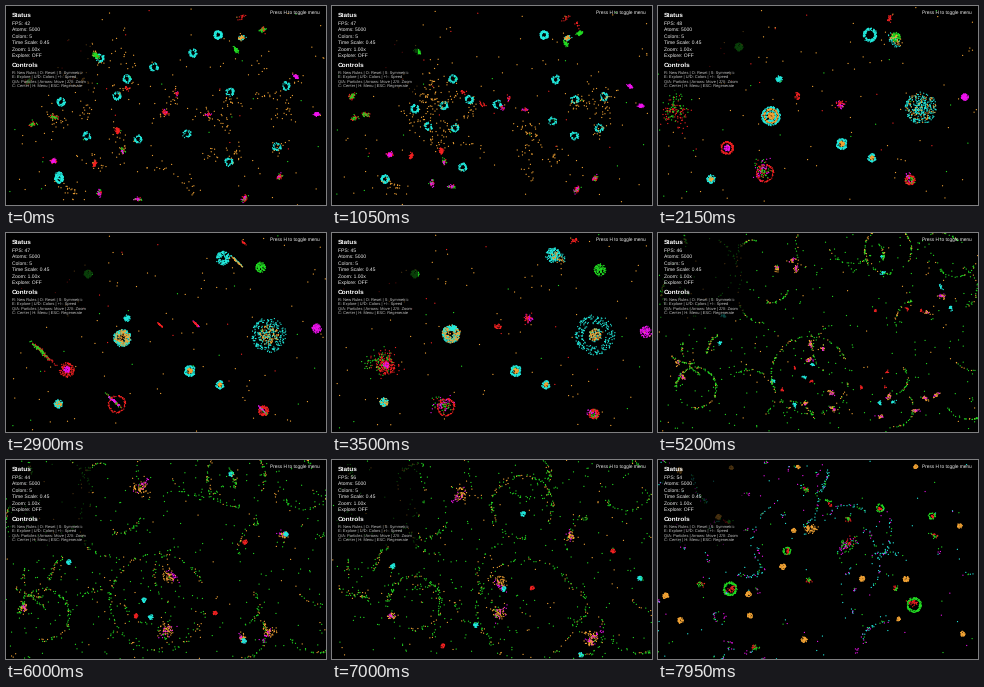
A matplotlib script for the animation above (8 s loop, 320 by 199 pixels).

```python
import numpy as np
import matplotlib.pyplot as plt
from matplotlib.animation import FuncAnimation
from matplotlib.colors import to_rgb
from matplotlib.patches import Rectangle

W, H, FRAMES, STEP = 320, 199, 160, 50
COLORS = {"g": "#22dc22", "o": "#f5a535", "c": "#22ecdf", "m": "#f012f0", "r": "#f52222"}
rng = np.random.default_rng(11)


def grid(nx, ny):
    """Jittered grid of sites in random order."""
    x, y = np.meshgrid(np.arange(nx) + 0.5, np.arange(ny) + 0.5)
    p = np.column_stack([x.ravel(), y.ravel()]) + rng.uniform(-0.38, 0.38, (nx * ny, 2))
    return rng.permutation(p * [W / nx, H / ny])


def polar(a, u, r, hole=0):
    d = np.sqrt(hole ** 2 + (r * r - hole ** 2) * u)
    return np.column_stack([d * np.cos(a), d * np.sin(a)])


def lump(n, r):
    """Irregular clump, longer along one random direction."""
    a = rng.uniform(0, np.pi)
    turn = np.array([[np.cos(a), np.sin(a)], [-np.sin(a), np.cos(a)]])
    return rng.normal(0, r, (n, 2)) * [0.6, 0.35] @ turn


class Scene:
    """Particles with three waypoints: a moving centre plus a changing offset."""

    def __init__(self, start, times, sites=(), scatter=True):
        self.start, self.times, self.scatter = start, times, scatter
        self.sites = {c: np.array(sites, float).reshape(-1, 2) for c in COLORS}
        self.centres, self.offsets, self.tints = [], [], ""

    def add(self, tints, centres, offsets):
        n = len(tints)
        self.tints += "".join(tints)
        self.centres.append(np.array([np.broadcast_to(c, (n, 2)) for c in centres], float))
        self.offsets.append(np.array(offsets, float))

    def take(self, k, c, near):
        """Claim the k free sites closest to a point."""
        pool = self.sites[c]
        order = np.argsort(((pool - near) ** 2).sum(1))
        got = pool[order[:k]]
        self.sites[c] = pool[order[k:]]
        return got if len(got) else np.array([near], float)

    def grow(self, tints, p1, p2, o1, o2, size, cells):
        """Small cells that travel to p1, merge there, then drift to p2."""
        home = self.take(cells, tints[0], p1)
        cell = rng.integers(0, len(home), len(tints))
        o0 = np.zeros_like(o1)
        for i in range(len(home)):
            m = cell == i
            n = m.sum()
            if set(tints) == {"c"} and n > 30:
                o0[m] = polar(rng.uniform(0, 7, n), rng.random(n), 4.3, 2.3)
            else:
                o0[m] = lump(n, size)
        self.add(tints, (home[cell], p1, p2), (o0, o1, o2))

    def disc(self, c, p1, p2, r, hole=0, later=None, dense=1.7, per=45, size=2.4):
        n = int(dense * np.pi * (r * r - hole ** 2)) + 3
        a, u = rng.uniform(0, 2 * np.pi, n), rng.random(n)
        o1 = polar(a, u, r, hole)
        o2 = polar(a + 0.6, u, *later) if later else o1
        if c == "o" and not self.scatter:
            per, size = 13, 12
        self.grow([c] * n, p1, p2, o1, o2, size, max(1, n // per))

    def swarm(self, mix, p1, p2, r, n, cells=2):
        """Tangle of several colours, one lobe per letter."""
        o1 = np.vstack([lump(n, r) + rng.normal(0, r * 0.3, 2) for _ in mix])
        self.grow(list(np.repeat(list(mix), n)), p1, p2, o1, o1[:, ::-1], 3, cells)

    def arc(self, mix, n, p1, p2, r, sweep):
        a = np.radians(rng.uniform(0, 360) + rng.uniform(0, sweep, n))
        rim, noise = polar(a, 1, r), rng.normal(0, 0.5, (n, 2))
        self.add(rng.choice(list(mix), n), (p1, p1, p2),
                 (rim * 0.8 + noise, rim + 2 * noise, rim * 1.05 + 2.5 * noise))

    def arcs(self, mix, count, n, r, sweep):
        for p in grid(count, count)[:count]:
            self.arc(mix, n, p, p + rng.normal(0, 6, 2),
                     rng.uniform(*r), rng.uniform(*sweep))

    def dust(self, mix, n):
        p, d = rng.random((n, 2)) * [W, H], rng.normal(0, 6, (n, 2))
        self.add(rng.choice(list(mix), n), (p - d, p, p + d), np.zeros((3, n, 2)))

    def build(self):
        self.centres = np.concatenate(self.centres, 1)
        self.offsets = np.concatenate(self.offsets, 1)
        self.tints = np.array([to_rgb(COLORS[c]) for c in self.tints])
        shape = self.tints.shape[0], 2
        self.noise = rng.random(shape) * [W, H]
        self.phase = rng.uniform(0, 2 * np.pi, shape)
        return self

    def at(self, t):
        t0, t1, t2 = self.times
        i = int(t >= t1)
        if i:
            u = (t - t1) / (t2 - t1)
            v = min(u, 1)
        else:
            u = max(0, (t - t0) / (t1 - t0))
            v = max(0, 2 * u - 1)
            u = u * u * (3 - 2 * u)
        p = sum(k[i] * (1 - w) + k[i + 1] * w
                for k, w in ((self.centres, u), (self.offsets, v)))
        if self.scatter:
            loose = max(0, 1 - (t - self.start) / 0.45) ** 2
            p = p * (1 - loose) + self.noise * loose
        return p + 0.25 * np.sin(9 * t + self.phase)


def orbs():
    s = Scene(0, (0, 2.15, 3.5), grid(9, 6), scatter=False)
    s.sites["c"] = np.array([(94, 52), (148, 61), (111, 90), (55, 96), (81, 130), (132, 133),
                             (181, 128), (223, 156), (224, 86), (187, 47), (280, 80),
                             (271, 141), (53, 170)], float)
    eye = (113, 110), (119, 101)
    for c, r, hole in ("c", 9.5, 7.8), ("o", 7.4, 5.8), ("c", 5.4, 4), ("o", 3.6, 0):
        s.disc(c, *eye, r, hole, (9, hole / 2))
    halo = (263, 102), (263, 102)
    s.disc("c", *halo, 16, 0, (20, 11), dense=0.28)
    s.disc("c", *halo, 7, 0, dense=0.4)
    s.disc("o", *halo, 15, 0, (6, 0), dense=0.11)
    for p in (184, 138), (214, 152):
        r = 5.6 if p[0] < 200 else 4.2
        s.disc("c", p, p, r, r * 0.55)
        s.disc("o", p, p, r * 0.5)
    s.disc("c", (53, 173), (52, 169), 4.2)
    s.disc("o", (53, 173), (52, 169), 2, 0, (4.2, 0))
    s.disc("c", (121, 73), (121, 95), 3.2)
    s.disc("c", (212, 29), (221, 22), 7, 4.5, (7.5, 0))
    s.disc("g", (238, 31), (268, 37), 4.5, 0, (6, 0))
    s.swarm("co", (235, 32), (224, 22), 6, 30)
    s.disc("m", (307, 91), (314, 99), 3.5, 0, (6, 0), dense=2.5)
    s.disc("g", (81, 41), (83, 41), 4)
    s.disc("r", (69, 142), (54, 133), 6.6, 5, (9, 0))
    s.disc("m", (69, 142), (54, 132), 3)
    s.swarm("rrrgg", (18, 106), (51, 130), 12, 28, 3)
    s.swarm("rgm", (107, 167), (114, 174), 9, 36, 3)
    s.disc("r", (107, 167), (114, 174), 9, 7.5, dense=0.8)
    s.disc("r", (252, 174), (262, 181), 5, 2.2)
    s.swarm("gm", (252, 174), (262, 181), 4, 16)
    s.swarm("mr", (183, 98), (196, 86), 4, 26, 3)
    s.swarm("r", (141, 90), (166, 95), 4, 30)
    s.swarm("r", (232, 13), (243, 8), 4, 24)
    s.dust("ooooorg", 125)
    return s.build()


def webs():
    s = Scene(3.85, (4.35, 6, 7), grid(8, 6))
    s.sites.update({c: grid(6, 4) for c in "cr"})
    hubs = [((133, 28), (129, 33)), ((164, 116), (168, 123)), ((162, 170), (167, 154)),
            ((263, 173), (262, 177)), ((277, 75), (239, 76)), ((19, 147), (59, 157)),
            ((237, 178), (258, 183))]
    for i, hub in enumerate(hubs):
        s.swarm("ooom", *hub, 7 if i < 4 else 4, 18 if i < 4 else 11, 3 if i < 4 else 2)
    blues = [((225, 14), (191, 54)), ((63, 102), (61, 106)), ((145, 157), (144, 165)),
             ((138, 140), (172, 129)), ((280, 74), (308, 118)), ((238, 181), (249, 195))]
    for b in blues:
        s.disc("c", *b, 2.5, per=16, size=2)
    for red in ((130, 156), (111, 186)), ((209, 153), (200, 128)), ((239, 82), (281, 91)):
        s.disc("r", *red, 2.2, per=9, size=1.7)
    for p1, p2, r in (((230, 17), (190, 47), 29), ((152, 142), (195, 150), 48),
                      ((38, 155), (82, 143), 25)):
        s.arc("ggo", 100, p1, p2, r, 330)
    s.arcs("gggo", 24, 26, (16, 38), (60, 170))
    s.dust("gggo", 330)
    return s.build()


def seeds():
    s = Scene(7.45, (7.45, 7.95, 8.5))
    for p, r in ((72, 129), 7), ((256, 145), 7.5), ((222, 48), 4), ((274, 56), 3.5), ((129, 91), 4):
        s.disc("g", p, p, r, r * 0.72)
        s.swarm("r", p, p, r * 0.6, int(r * 4))
    s.swarm("oo", (152, 68), (152, 68), 5, 34)
    for p in grid(6, 4)[:17]:
        s.disc("o", p, p, rng.uniform(2, 3.1))
    for p in grid(6, 4)[:9]:
        s.swarm("rg", p, p, 3, 11)
    s.swarm("ggrm", (190, 83), (190, 83), 7, 18)
    s.arcs("ccccmg", 13, 26, (26, 48), (50, 120))
    s.arcs("cmmg", 34, 6, (6, 14), (30, 70))
    s.dust("ccmg", 110)
    return s.build()


SCENES = [orbs(), webs(), seeds()]
FPS = [42, 44, 47, 46, 48, 47, 46, 45, 45, 43, 46, 45, 44, 50, 56, 54]

plt.rcParams.update({"font.family": "Liberation Sans", "text.hinting": "none"})
fig = plt.figure(figsize=(W / 100, H / 100), dpi=100, facecolor="black")
ax = fig.add_axes([0, 0, 1, 1])
ax.set(xlim=(0, W), ylim=(H, 0))
ax.axis("off")
dots = ax.scatter([], [], s=(1.25 * 0.72) ** 2, marker="o", linewidths=0)
ax.add_patch(Rectangle((3, 3), 83, 83, fc="black", alpha=0.7, lw=0, zorder=3))


def label(x, y, s, px, color="#f0f0f0", **kw):
    return ax.text(x, y, s, size=px * 0.72, color=color, va="baseline", zorder=4, **kw)


label(6, 11.3, "Status", 6.5, "white", weight="bold")
label(6, 61.3, "Controls", 6.5, "white", weight="bold")
label(313.5, 8, "Press H to toggle menu", 4.7, ha="right")
fps = label(6, 18.8, "", 4.95)
for i, s in enumerate(["Atoms: 5000", "Colors: 5", "Time Scale: 0.45",
                       "Zoom: 1.00x", "Explore: OFF"]):
    label(6, 25.3 + 6.5 * i, s, 4.95)
for i, s in enumerate(["R: New Rules | O: Reset | S: Symmetric",
                       "E: Explore | U/D: Colors | +/-: Speed",
                       "Q/A: Particles | Arrows: Move | Z/X: Zoom",
                       "C: Center | H: Menu | ESC: Regenerate"]):
    label(6, 68.2 + 4.25 * i, s, 3.95, "#c8c8c8")


def update(k):
    t = k * STEP / 1000
    scene = [s for s in SCENES if s.start <= t + 1e-9][-1]
    dots.set_offsets(scene.at(t))
    dots.set_facecolor(scene.tints)
    fps.set_text(f"FPS: {FPS[k // 10]}")
    return dots, fps


anim = FuncAnimation(fig, update, frames=FRAMES, interval=STEP, repeat=True,
                     repeat_delay=0, blit=False)
plt.show()
```
